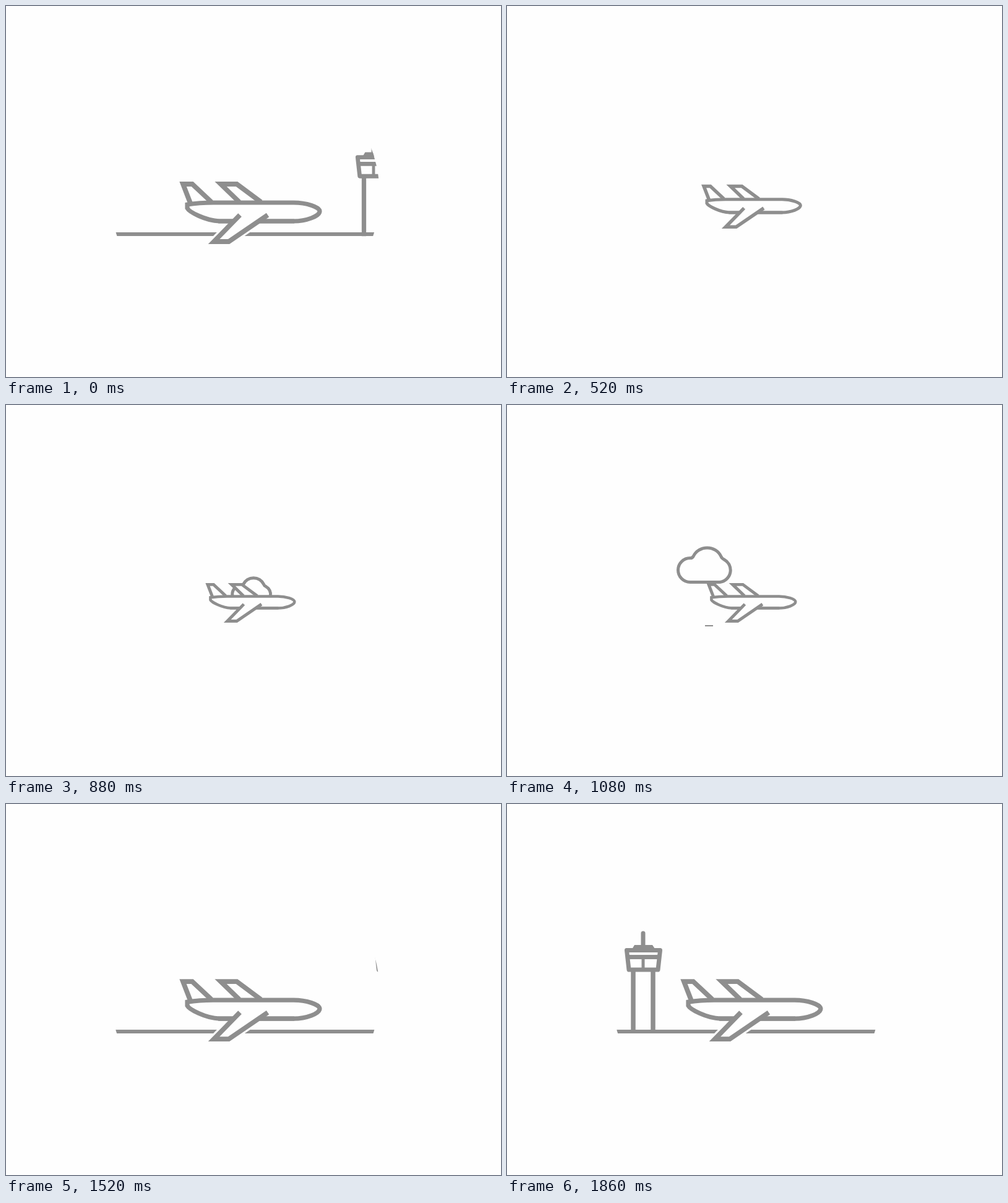
Recreate the animation shown at these times as an HTML page. Size 800 by 600 pixels, loop 1.88 s.

```html
<!DOCTYPE html>
<html lang="en">
<head>
<meta charset="utf-8">
<title>Flight</title>
<style>
  html, body { margin: 0; width: 100%; height: 100%; overflow: hidden; background: #fefefe; }
  svg { display: block; width: 800px; height: 600px; }
  .line { stroke: #8e8e8e; fill: #fefefe; stroke-miterlimit: 8; }
  .solid { fill: #8e8e8e; }
  .halo { stroke: #fefefe; fill: #fefefe; stroke-width: 14; stroke-miterlimit: 8; }
  #cloud { vector-effect: non-scaling-stroke; }
</style>
</head>
<body>
<svg viewBox="0 0 800 600">
  <clipPath id="porthole"><circle cx="386.3" cy="305" r="217.5"/></clipPath>
  <g clip-path="url(#porthole)">
    <rect id="ground" class="solid" x="160" y="-3" width="460" height="6"/>

    <!-- drawn around the middle of its base -->
    <g id="tower">
      <path class="line" stroke-width="7.5" d="M-16 2V-98M16 2V-98"/>
      <path class="line" stroke-width="7" stroke-linecap="round" d="M0 -157V-134"/>
      <path class="solid" d="M-17.5 -132L-14 -138H15L19 -132Z"/>
      <path class="line" stroke-width="7" stroke-linejoin="round" d="M-26.5 -129.5H27.5L24 -98H-23Z"/>
      <path class="line" stroke-width="7" d="M-25 -118.5H25"/>
      <path class="line" stroke-width="5" d="M0 -118V-98"/>
    </g>

    <rect id="dash" class="solid" x="-6.5" y="-1" width="13" height="2"/>

    <path id="cloud" class="line" stroke-width="5" d="M-24 28A19.5 19.5 0 0 1 -24 -11Q-21 -10.500 -19 -13.500
      A25 25 0 0 1 26 -13.500Q27 -10.500 31 -8.500A19.5 19.5 0 0 1 24 28Z"/>

    <g id="plane" stroke-width="7.8">
      <path class="line" d="M298 319L286 288H301L332 317"/>
      <path class="line" d="M377 317L347 288H373L412 317"/>
      <path class="halo" d="M378 338L336 381H360L423 338"/>
      <path class="line" stroke-width="7.200" d="M345 348C322 347 296 333 293 327V321C306 319 322 318 335 318
        H465C485 318 507 325 507 332C507 340 485 348 465 348Z"/>
      <path fill="#fefefe" d="M370 346H410L402 353H362Z"/>
      <path class="line" stroke-width="7.200" d="M343 348H370M408 348H466"/>
      <path class="line" d="M378 338L336 381H360L423 338"/>
    </g>
  </g>
</svg>
<script>
const LOOP = 1880, STEP = 20;
const el = id => document.getElementById(id);
const ground = el('ground'), tower = el('tower'), dash = el('dash'), cloud = el('cloud'), plane = el('plane');

const linear = p => p;
const inQuad = p => p * p;
const outQuad = p => 1 - (1 - p) ** 2;
const outQuint = p => 1 - (1 - p) ** 5;
const inOut = p => p * p * (3 - 2 * p);

// Rows are [time, value, easing towards this row].
function track(rows, t) {
  if (t <= rows[0][0]) return rows[0][1];
  for (let i = 1; i < rows.length; i++) {
    const [t0, v0] = rows[i - 1], [t1, v1, ease = linear] = rows[i];
    if (t < t1) return v0 + (v1 - v0) * ease((t - t0) / (t1 - t0));
  }
  return rows[rows.length - 1][1];
}

const size = [[320, 1], [680, 0.635, outQuad], [1220, 0.635], [1500, 1, inOut]];
const tilt = [[180, 0], [280, -4, inQuad], [360, -9, outQuad], [500, 0, inOut],
              [1240, 0], [1350, 4, inOut], [1480, 0, inOut]];
const lift = [[160, 0], [280, -0.8], [520, 1.6], [680, 0], [1220, 0], [1500, -0.9]];
const groundY = [[290, 369], [450, 432, inQuad], [1280, 436], [1480, 368, outQuad]];
const groundAlpha = [[330, 1], [460, 0], [1270, 0], [1380, 1]];
const leaveX = [[140, 594], [280, 151.6], [340, -60]];
const arriveX = [[1500, 759.5], [1860, 220, outQuint]];
const cloudX = [[680, 640], [880, 397.5, outQuad], [1080, 320], [1220, 105, inQuad]];
const cloudY = [[680, 312], [880, 299.8], [1080, 258.5], [1220, 262]];
const cloudSize = [[680, 0.6], [880, 0.73], [1080, 1]];
const dashX = [[1040, 350], [1080, 326.5], [1220, 160, inQuad]];
const dashY = [[1040, 350], [1080, 357], [1220, 388]];
const dashSize = [[1040, 0.6], [1080, 1], [1220, 2]];

function place(node, x, y, scale) {
  node.setAttribute('transform', `translate(${x} ${y}) scale(${scale})`);
}

function show(node, on) {
  node.style.visibility = on ? 'visible' : 'hidden';
}

function draw(time) {
  let t = Math.floor((time % LOOP) / STEP) * STEP;
  if (t < 160) t = 140;

  const leaving = t < 340;
  show(tower, leaving || t >= 1500);
  if (leaving) place(tower, track(leaveX, t), 370.3, 0.97);
  else place(tower, track(arriveX, t), 366, 1);

  place(ground, 0, track(groundY, t), 1);
  ground.setAttribute('opacity', track(groundAlpha, t));

  show(cloud, t >= 700 && t < 1220);
  place(cloud, track(cloudX, t), track(cloudY, t), track(cloudSize, t));
  show(dash, t >= 1040 && t < 1220);
  place(dash, track(dashX, t), track(dashY, t), track(dashSize, t));

  plane.setAttribute('transform',
    `translate(395.5 ${294.5 + track(lift, t)}) scale(${track(size, t)}) translate(-395.5 -294.5) rotate(${track(tilt, t)} 400 333)`);
}

const start = performance.now();
function tick() {
  draw(performance.now() - start);
  requestAnimationFrame(tick);
}
tick();
</script>
</body>
</html>
```
